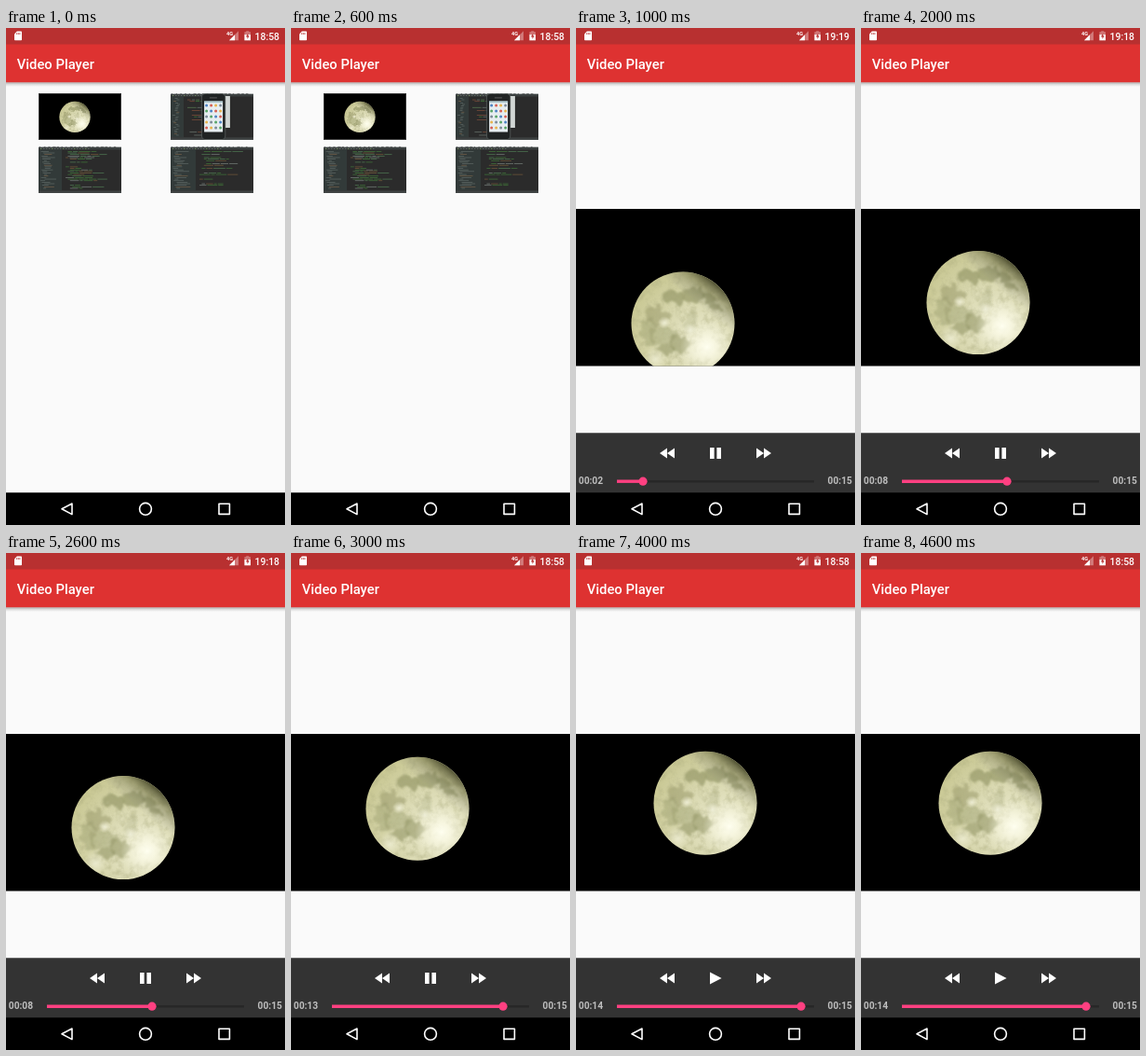
Animation of 300x533 px, one loop 5000 ms. Source, as an HTML page:

```html
<!DOCTYPE html>
<html lang="en">
<head>
<meta charset="utf-8">
<title>Video Player</title>
<style>
  html, body { margin: 0; width: 100%; height: 100%; overflow: hidden; background: #fafafa; }
  svg { display: block; width: 100%; height: 100%; }
  text { font-family: Roboto, "Noto Sans", sans-serif; font-weight: 500; fill: #fff; }
  .clock { font-size: 10.4px; }
  .time { font-size: 10.2px; font-weight: 700; fill: #bebebe; }
  /* each shot holds one fifth of the loop */
  .shot { animation: hold 5s step-end infinite; animation-delay: calc(var(--i) * 1s - 5s); visibility: hidden; }
  .player { animation: play 5s step-end infinite; }
  @keyframes hold { 0% { visibility: visible; } 20%, 100% { visibility: hidden; } }
  @keyframes play { 0% { visibility: hidden; } 20%, 100% { visibility: visible; } }
</style>
</head>
<body>
<svg viewBox="0 0 300 533" preserveAspectRatio="none">
  <defs>
    <linearGradient id="shade" x2="0" y2="1">
      <stop stop-color="#000" stop-opacity=".34"/>
      <stop offset=".4" stop-color="#000" stop-opacity=".13"/>
      <stop offset="1" stop-color="#000" stop-opacity="0"/>
    </linearGradient>
    <radialGradient id="disc" gradientUnits="userSpaceOnUse" cx="22" cy="22" r="85">
      <stop stop-color="#eeedd2"/>
      <stop offset=".45" stop-color="#dcdbb5"/>
      <stop offset="1" stop-color="#c9c894"/>
    </radialGradient>
    <linearGradient id="dusk" x1=".82" y1=".1" x2=".5" y2=".5">
      <stop stop-color="#2c2d14" stop-opacity=".85"/>
      <stop offset=".22" stop-color="#55562f" stop-opacity=".4"/>
      <stop offset=".55" stop-color="#777" stop-opacity="0"/>
    </linearGradient>
    <radialGradient id="glow">
      <stop stop-color="#fffff0"/>
      <stop offset=".35" stop-color="#fbfae6" stop-opacity=".75"/>
      <stop offset="1" stop-color="#f5f4dc" stop-opacity="0"/>
    </radialGradient>
    <filter id="soft" x="-20%" y="-20%" width="140%" height="140%">
      <feTurbulence type="fractalNoise" baseFrequency=".11" numOctaves="4" seed="4" result="n"/>
      <feDisplacementMap in="SourceGraphic" in2="n" scale="14" xChannelSelector="R" yChannelSelector="G"/>
      <feGaussianBlur stdDeviation="1.2"/>
    </filter>
    <filter id="grain" x="0" y="0" width="100%" height="100%">
      <feTurbulence type="fractalNoise" baseFrequency=".13" numOctaves="4" seed="9"/>
      <feColorMatrix values="0 0 0 0 .42  0 0 0 0 .42  0 0 0 0 .22  2.2 0 0 0 -.95"/>
      <feComposite in2="SourceGraphic" operator="in"/>
    </filter>
    <clipPath id="limb"><circle r="55.5"/></clipPath>
    <clipPath id="video"><path d="M0 194H300V362.6H0z"/></clipPath>
    <g id="moon">
      <circle r="55.5" fill="url(#disc)"/>
      <g clip-path="url(#limb)">
        <g filter="url(#soft)" fill="#8d8f5f" fill-opacity=".62">
          <ellipse cx="-8" cy="-27" rx="12" ry="8"/>
          <ellipse cx="12" cy="-31" rx="12" ry="8"/>
          <ellipse cx="27" cy="-28" rx="8" ry="6"/>
          <ellipse cx="35" cy="-18" rx="5" ry="6"/>
          <ellipse cx="-28" cy="-9" rx="13" ry="10" fill-opacity=".45"/>
          <ellipse cx="-38" cy="9" rx="9" ry="15" fill-opacity=".35"/>
          <ellipse cx="-22" cy="12" rx="14" ry="11" fill-opacity=".35"/>
          <ellipse cx="-5" cy="22" rx="11" ry="9" fill-opacity=".55"/>
          <ellipse cx="-18" cy="28" rx="11" ry="6" fill-opacity=".55"/>
          <ellipse cx="9" cy="-2" rx="6" ry="13" fill-opacity=".2"/>
        </g>
        <circle r="55.5" filter="url(#grain)" opacity=".5"/>
        <circle cx="26" cy="25" r="29" fill="url(#glow)"/>
        <circle cx="-20" cy="-1" r="7" fill="url(#glow)" opacity=".6"/>
        <circle cx="8" cy="7" r="8" fill="url(#glow)" opacity=".6"/>
        <circle cx="-30" cy="38" r="13" fill="url(#glow)" opacity=".5"/>
        <circle r="55.5" fill="url(#dusk)"/>
      </g>
    </g>
    <path id="skip" d="M0 0L8 -5.5V5.5zM8 0L16 -5.5V5.5z"/>
  </defs>

  <path fill="#fafafa" d="M0 0H300V533H0z"/>
  <path fill="url(#shade)" d="M0 58.3H300V63H0z"/>
  <path fill="#de3231" d="M0 17H300V58.3H0z"/>
  <path fill="#b83030" d="M0 0H300V17.5H0z"/>
  <text x="11.7" y="43.9" font-size="14.8">Video Player</text>

  <!-- status icons -->
  <g fill="#fff">
    <path d="M11.8 3.6H16.2Q17 3.6 17 4.4V12.4Q17 13.2 16.2 13.2H9.8Q9 13.2 9 12.4V6.4z"/>
    <path d="M11.7 5.2V7M13.3 5.2V7M14.9 5.2V7" stroke="#b83030" stroke-width=".8"/>
    <path d="M250 3.2V13.2H240z" fill-opacity=".35"/>
    <path d="M246 7.2V13.2H240z"/>
    <text x="237" y="8.2" font-size="5.6" style="font-weight:700">4G</text>
    <path d="M258.2 3.3H261.2V4.3H263V8H256.4V4.3H258.2z" fill-opacity=".35"/>
    <path d="M256.4 7.2H263V13.3H256.4z"/>
    <path d="M260.2 5.5L258 9.4H259.5V12L261.6 8.3H260.2z" fill="#b83030"/>
  </g>

  <g id="shots"></g>

  <g class="player">
    <path fill="#333" d="M0 434.2H300V499H0z"/>
    <g fill="#fff">
      <use href="#skip" x="90" y="456"/>
      <use href="#skip" transform="translate(210 456) scale(-1 1)"/>
    </g>
    <path d="M44 486.2H256" stroke="#272727" stroke-width="2.4"/>
    <text class="time" x="270.6" y="489.2">00:15</text>
  </g>
  <g id="progress"></g>

  <path d="M0 498.3H300V533H0z"/>
  <g fill="none" stroke="#fff" stroke-width="1.6" stroke-linejoin="round">
    <path d="M60 515.8L71 510V521.6zM229 510.2H240.4V521.4H229z"/>
    <circle cx="150" cy="515.8" r="6.4"/>
  </g>
</svg>
<script>
  const $ = id => document.getElementById(id);
  const rect = (x, y, w, h, fill) =>
    `<rect x="${x}" y="${y}" width="${w}" height="${h}" fill="${fill}"/>`;
  const shot = (i, body) => `<g class="shot" style="--i:${i}">${body}</g>`;

  function random(seed) {
    return () => (seed = (seed * 16807) % 2147483647) / 2147483647;
  }

  // A tiny editor window: toolbar, file tree and coloured lines of code.
  function editor(x, y, seed, tree, colors) {
    const rnd = random(seed);
    let s = rect(x, y, 89, 50, '#2b2b2b') + rect(x, y, 89, 3.4, '#3c4141') +
      rect(x, y, 89, 1, '#b9bcbc') + rect(x, y + 3.4, tree, 44, '#323a39') +
      rect(x, y + 47.4, 89, 2.6, '#3f4343');
    for (let i = 0; i < 18; i++)
      s += rect(x + 1 + i * 4.7, y + .2, 1 + rnd() * 2.5, .7, '#565a5a') +
        rect(x + 2 + i * 3, y + 2, 1.4, .8, i % 4 ? '#6d7471' : '#7d9a67');
    for (let r = 0; r < 25; r++) {
      const ty = y + 5 + r * 1.65;
      s += rect(x + 2 + rnd() * 5, ty, 3 + rnd() * (tree - 14), .7, r % 7 == 2 ? '#75604a' : '#5d6865');
      if (rnd() < .15 + r / 50) continue;
      let cx = x + tree + 4 + Math.floor(rnd() * 4) * 2.4;
      for (let n = 1 + rnd() * 3; n > 0; n--) {
        const w = 3 + rnd() * 10;
        s += rect(cx, ty, w, .75, colors[Math.floor(rnd() * colors.length)]);
        cx += w + 1;
      }
    }
    return s;
  }

  function phone(x, y) {
    const tints = ['#4d83c4', '#e7b34c', '#58a567', '#d65f54', '#7d8b98'];
    let s = rect(x + 25, y + 2.5, 5.5, 34, '#d2d7d5') +
      `<rect x="${x}" y="${y}" width="25.4" height="49" rx="3.5" fill="#202323" stroke="#68706e" stroke-width=".6"/>` +
      rect(x + 2.7, y + 8, 20, 33, '#e6edf0') + rect(x + 2.7, y + 8, 20, 1.6, '#a9c6cd') +
      rect(x + 8.5, y + 4, 8, .8, '#666');
    for (let i = 0; i < 20; i++)
      s += `<circle cx="${x + 5.2 + i % 4 * 5}" cy="${y + 12.6 + Math.floor(i / 4) * 6}" r="1.5" fill="${tints[i * 3 % 5]}"/>`;
    return s;
  }

  const clock = t => `<text class="clock" x="267.6" y="12.9">${t}</text>`;
  const greens = ['#3f7038', '#3f7038', '#4d7550', '#717a75', '#6f5638'];

  const gallery = clock('18:58') +
    '<rect x="35.5" y="70.5" width="88" height="49" stroke="#333"/>' +
    '<use href="#moon" transform="translate(74 95.4) scale(.3)"/>' +
    editor(177, 70, 77, 14, ['#3f7a37', '#7a4b38', '#55764e', '#68726d']) + phone(210.4, 70.5) +
    editor(35, 127, 1234, 25, greens) +
    editor(177, 127, 4321, 27, greens);

  // clock, seconds played, knob x, moon x, moon y
  const shots = [
    ['19:19', 2, 72, 115, 317],
    ['19:18', 8, 157, 126, 294.6],
    ['18:58', 13, 228, 136, 274.2],
    ['18:58', 14, 242, 139, 268.2]
  ];

  const pause = '<path fill="#fff" d="M144 450H148.6V462H144zM151.4 450H156V462H151.4z"/>';
  const play = '<path fill="#fff" d="M144 449.4L156.6 456L144 462.6z"/>';

  const film = ([time, , , x, y]) => clock(time) +
    `<g clip-path="url(#video)"><path d="M0 194H300V363H0z"/><use href="#moon" x="${x}" y="${y}"/></g>`;

  const bar = ([, sec, x], last) => (last ? play : pause) +
    `<text class="time" x="2.8" y="489.2">00:${String(sec).padStart(2, '0')}</text>` +
    `<path d="M44 486.2H${x}" stroke="#ff4081" stroke-width="3.4"/>` +
    `<circle cx="${x}" cy="486.2" r="4.6" fill="#ff4081"/>`;

  $('shots').innerHTML = shot(0, gallery) + shots.map((s, i) => shot(i + 1, film(s))).join('');
  $('progress').innerHTML = shots.map((s, i) => shot(i + 1, bar(s, i == 3))).join('');
</script>
</body>
</html>
```
